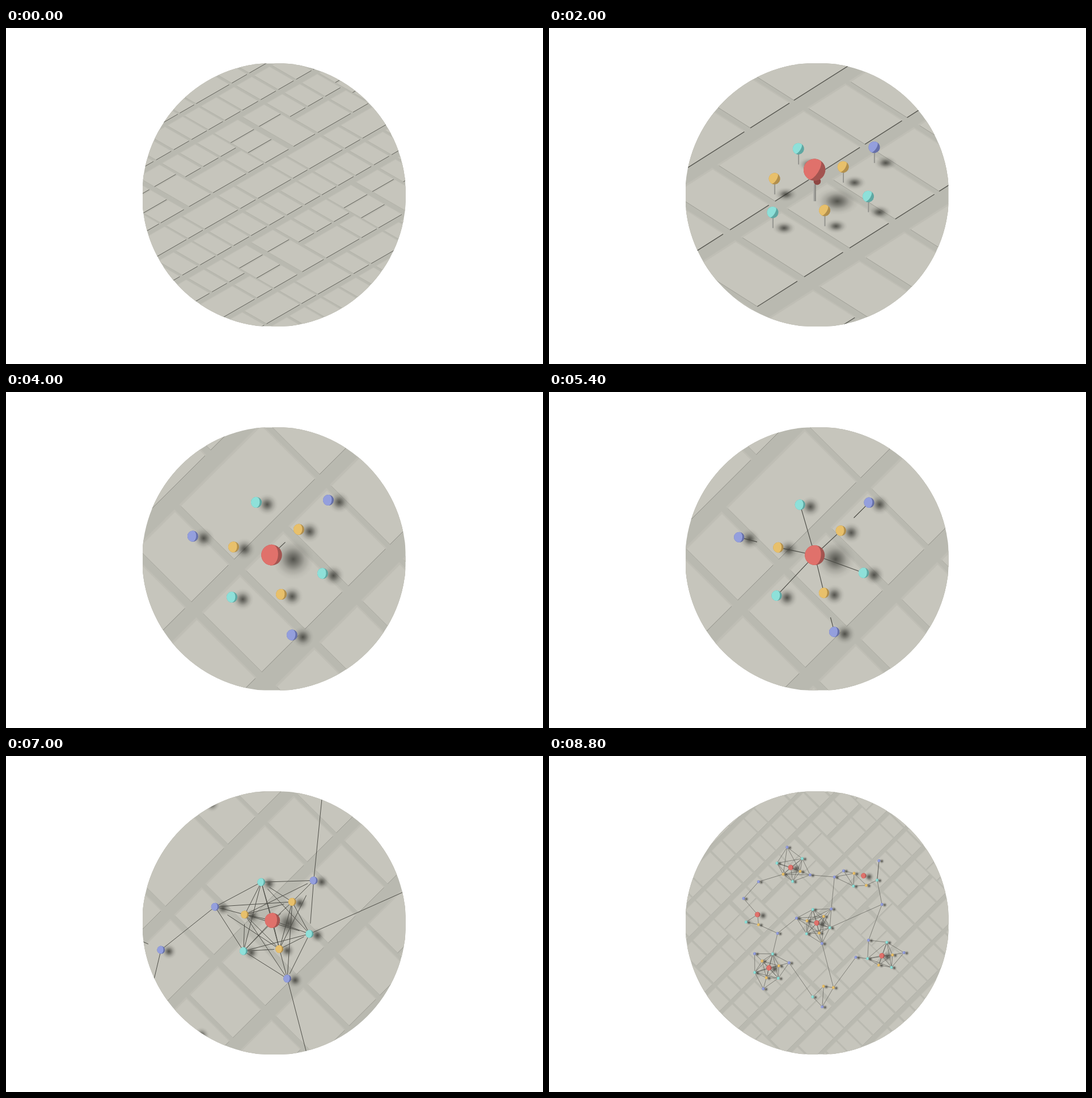
Recreate the animation shown at these times as an HTML page with a canvas. Size 947 px wide and 592 px high, loop 9 s.

```html
<!DOCTYPE html>
<html lang="en">
<head>
<meta charset="utf-8">
<title>Map pins</title>
<style>
  html, body { margin: 0; width: 100%; height: 100%; overflow: hidden; background: #fff; }
  canvas { display: block; }
</style>
</head>
<body>
<canvas id="map" width="947" height="592"></canvas>
<script>
const ctx = document.getElementById('map').getContext('2d');
const LOOP = 9000, STEP = 200, TAU = Math.PI * 2;

const clamp = v => Math.max(0, Math.min(1, v));
const lerp = (a, b, f) => a + (b - a) * f;
const ramp = (t, from, to) => clamp((t - from) / (to - from));
const smooth = f => f * f * (3 - 2 * f);

// City blocks of one repeating tile: p runs down-right, q runs up-right.
const TILE_P = 974, TILE_Q = 900;
const ROWS = [
  [-30, 176.5, [-221, -91, -69, 62, 84, 215, 231, 354, 372, 504, 522, 656]],
  [230, 429, [-221, -89, -67, 62, 82, 212]],
  [230, 369, [228, 428, 472, 656]],
  [382, 518, [228, 428]],
  [532, 667, [228, 428]],
  [382, 667, [472, 656]],
  [475, 667, [-221, 62, 82, 213]],
  [714, 902, [-221, -91, -70, 214, 231, 355, 372, 656]]
];
const blocks = [];
for (let i = -2; i <= 1; i++) {
  for (let j = -2; j <= 2; j++) {
    for (const [p0, p1, qs] of ROWS) {
      for (let n = 0; n < qs.length; n += 2) {
        blocks.push({ p: p0 + i * TILE_P, q: qs[n] + j * TILE_Q, w: p1 - p0, h: qs[n + 1] - qs[n] });
      }
    }
  }
}

// Pins, grouped; x, y pairs on the ground.
const KINDS = {
  r: { light: '#e0716b', dark: '#a35450', size: 18.3, height: 68 },
  a: { light: '#8ee0d9', dark: '#5fa7a2', size: 9.6, height: 34 },
  o: { light: '#e8c06b', dark: '#b28f4c', size: 9.6, height: 34 },
  b: { light: '#949fdd', dark: '#6670a8', size: 9.6, height: 34 }
};
const GROUPS = [
  { reach: 190, r: [-5, -1], a: [-32, -98, -75, 70, 85, 28], o: [-72, -19, 43, -50, 12, 65], b: [95, -102, -144, -38, 31, 137] },
  { reach: 190, r: [-184, -385], a: [-279, -419, -105, -450, -171, -292], o: [-236, -342, -119, -362], b: [-51, -337, -209, -529] },
  { reach: 160, r: [-413, -59], a: [-492, -11], o: [-406, 7], b: [-406, -290, -509, -174, -275, 67] },
  { reach: 185, r: [-334, 310], a: [-309, 210, -270, 378, -432, 338], o: [-381, 259, -266, 292, -352, 375], b: [-433, 208, -196, 271, -373, 451] },
  { reach: 155, a: [-33, 507], o: [42, 434, 110, 443], b: [33, 576] },
  { reach: 180, r: [444, 226], a: [478, 129, 345, 242, 510, 303], o: [422, 287, 517, 217], b: [352, 115, 596, 201] },
  { reach: 0, r: [318, -328], b: [264, 233, 444, -133] },
  { reach: 150, a: [248, -260, 411, -301], o: [252, -348, 336, -265], b: [180, -366, 117, -323, 424, -436] }
];
const BRIDGES = '2b0-1o0 2b1-2r0 2b2-0b1 2b2-3a0 1b0-7b1 7b1-0b0 6b1-0a2 6b1-7a1 6b1-5b0 4o1-0b2 4o1-6b0 6b0-5a1 3b1-4a0 7b2-7a1';

const pins = [], byKey = {}, links = [];
const link = (from, to, start, time) => links.push({ from, to, start, time });
const noise = n => { const v = Math.sin(n * 12.9898) * 43758.5453; return v - Math.floor(v); };

GROUPS.forEach((group, g) => {
  const own = [];
  for (const kind of 'raob') {
    const xy = group[kind] || [];
    for (let n = 0; n < xy.length; n += 2) {
      const k = own.length;
      let born = 5000;
      if (g === 0) born = kind === 'r' ? 400 : k < 8 ? 900 + k * 110 : 2000 + (k - 7) * 300;
      const pin = { x: xy[n], y: xy[n + 1], kind, born, ...KINDS[kind] };
      own.push(pin);
      pins.push(pin);
      byKey[g + kind + n / 2] = pin;
    }
  }
  own.forEach((a, i) => own.slice(i + 1).forEach((b, n) => {
    const d = Math.hypot(a.x - b.x, a.y - b.y), k = i + n + 1;
    if (d >= (a.kind === 'r' ? 115 : group.reach)) return;
    if (g === 0 && a.kind === 'r') link(a, b, 3800 + (k + 1) % 6 * 250, 400);
    else if (g === 0 && b.kind === 'b' && d < 85) link(b, a, 4600 + k * 60, 700);
    else {
      const flip = noise(i * 11 + k) > .5;
      link(flip ? b : a, flip ? a : b, 5300 + noise(k * 7 + i) * 600, 1500);
    }
  }));
});
BRIDGES.split(' ').forEach(pair => {
  const [from, to] = pair.split('-');
  link(byKey[from], byKey[to], 5300, 1600);
});
pins.sort((a, b) => a.y - b.y);

function camera(t) {
  let s;
  if (t < 2000) s = .41 * Math.pow(1.053 / .41, t / 2000);
  else if (t < 4000) s = lerp(1.053, 1, ramp(t, 2000, 4000));
  else if (t < 6400) s = lerp(1, .93, ramp(t, 4000, 6400));
  else s = .93 * Math.pow(.256 / .93, smooth(ramp(t, 6400, 8550)));
  const tilt = lerp(lerp(35.1, 39.3, ramp(t, 0, 2000)), 83.7, smooth(ramp(t, 2000, 3800)));
  const e = tilt * Math.PI / 180, k = Math.sin(e), c = Math.cos(e);
  const cx = 473.5, cy = 294 + (1 - s) * 2.5 + s * c * 14.7;
  return { s, k, c, cx, cy, at: (x, y, z = 0) => [cx + s * x, cy + s * (k * y - c * z)] };
}

function drawGround({ s, k, c, cx, cy, at }) {
  ctx.fillStyle = '#b9b9b0';
  ctx.fillRect(240, 62, 466, 466);
  ctx.save();
  ctx.transform(s, 0, 0, s * k, cx, cy);
  ctx.transform(.5, .5, .5, -.5, 0, 0);
  ctx.fillStyle = '#bfbeb5';
  for (const b of blocks) ctx.fillRect(b.p - 6, b.q, b.w + 6, b.h + 4);
  ctx.fillStyle = '#c6c5bc';
  for (const b of blocks) ctx.fillRect(b.p, b.q, b.w, b.h);
  ctx.restore();

  const corner = (p, q) => at((p + q) / 2, (p - q) / 2);
  const front = new Path2D(), side = new Path2D();
  for (const b of blocks) {
    const low = corner(b.p + b.w, b.q);
    front.moveTo(...low);
    front.lineTo(...corner(b.p + b.w, b.q + b.h));
    side.moveTo(...low);
    side.lineTo(...corner(b.p, b.q));
  }
  const force = Math.min(1, s * .6 + c);
  ctx.lineWidth = .6 + s * c;
  ctx.strokeStyle = `rgba(70,70,64,${.85 * force})`;
  ctx.stroke(front);
  ctx.lineWidth = .8;
  ctx.strokeStyle = `rgba(110,110,102,${.5 * force * Math.min(1, s)})`;
  ctx.stroke(side);
}

function drawShadow(pin, g, { s, k, at }) {
  const [x, y] = at(pin.x + pin.height * .56 * g, pin.y);
  const r = pin.size * 2 * s * g;
  ctx.save();
  ctx.translate(x, y);
  ctx.scale(1, k);
  const fill = ctx.createRadialGradient(0, 0, 0, 0, 0, r);
  [[0, .75], [.25, .52], [.55, .2], [.8, .05], [1, 0]].forEach(([o, a]) => fill.addColorStop(o, `rgba(45,45,40,${a})`));
  ctx.fillStyle = fill;
  ctx.fillRect(-r, -r, r * 2, r * 2);
  ctx.restore();
}

function disc(x, y, rx, ry, color) {
  ctx.fillStyle = color;
  ctx.beginPath();
  ctx.ellipse(x, y, rx, ry, 0, 0, TAU);
  ctx.fill();
}

function drawPin(pin, g, { s, k, c, at }) {
  const red = pin.kind === 'r', r = pin.size * s * g;
  const [x0, y0] = at(pin.x, pin.y), [x, y] = at(pin.x, pin.y, pin.height * g);
  const w = (red ? 4.6 : 2.3) * s;
  const steel = ctx.createLinearGradient(x0 - w / 2, 0, x0 + w / 2, 0);
  steel.addColorStop(0, '#bdbdb7');
  steel.addColorStop(1, '#7c7c77');
  ctx.fillStyle = steel;
  ctx.fillRect(x0 - w / 2, y, w, y0 - y);
  if (red) {
    const [bx, by] = at(pin.x, pin.y, 43 * g);
    disc(bx - 2 * s, by, 8.5 * s * g, 5 * s * g, '#bab9b1');
    disc(bx + 4.5 * s, by, 6 * s * g, 6 * s * g, '#8e4743');
  }
  // Sphere lit from the left: dark disc, then the lit part up to the terminator.
  ctx.save();
  ctx.translate(x, y);
  ctx.rotate(Math.atan2(.8 * c, 1));
  disc(0, 0, r, r, pin.dark);
  ctx.fillStyle = pin.light;
  ctx.beginPath();
  ctx.arc(0, 0, r, Math.PI / 2, Math.PI * 1.5);
  ctx.ellipse(0, 0, r * .62 * k, r, 0, -Math.PI / 2, Math.PI / 2);
  ctx.fill();
  ctx.restore();
}

function drawLinks(t, { s, at }) {
  ctx.strokeStyle = '#4a4a44';
  ctx.lineWidth = .35 + .85 * s;
  ctx.beginPath();
  for (const { from, to, start, time } of links) {
    const f = ramp(t, start, start + time);
    if (!f) continue;
    const a = at(from.x, from.y, from.height), b = at(to.x, to.y, to.height);
    ctx.moveTo(...a);
    ctx.lineTo(lerp(a[0], b[0], f), lerp(a[1], b[1], f));
  }
  ctx.stroke();
}

function draw(t) {
  const cam = camera(t);
  ctx.clearRect(0, 0, 947, 592);
  ctx.save();
  ctx.beginPath();
  ctx.rect(241, 62.5, 463.5, 463);
  ctx.clip();
  ctx.beginPath();
  ctx.arc(472.7, 294, 232.6, 0, TAU);
  ctx.clip();
  drawGround(cam);
  const shown = pins.map(pin => [pin, smooth(ramp(t, pin.born, pin.born + 300))]).filter(([, g]) => g > 0);
  shown.forEach(([pin, g]) => drawShadow(pin, g, cam));
  drawLinks(t, cam);
  shown.forEach(([pin, g]) => drawPin(pin, g, cam));
  ctx.restore();
}

const begin = performance.now();
let last = -1;
function tick() {
  const t = Math.floor((performance.now() - begin) % LOOP / STEP) * STEP;
  if (t !== last) draw(last = t);
  requestAnimationFrame(tick);
}
tick();
</script>
</body>
</html>
```
